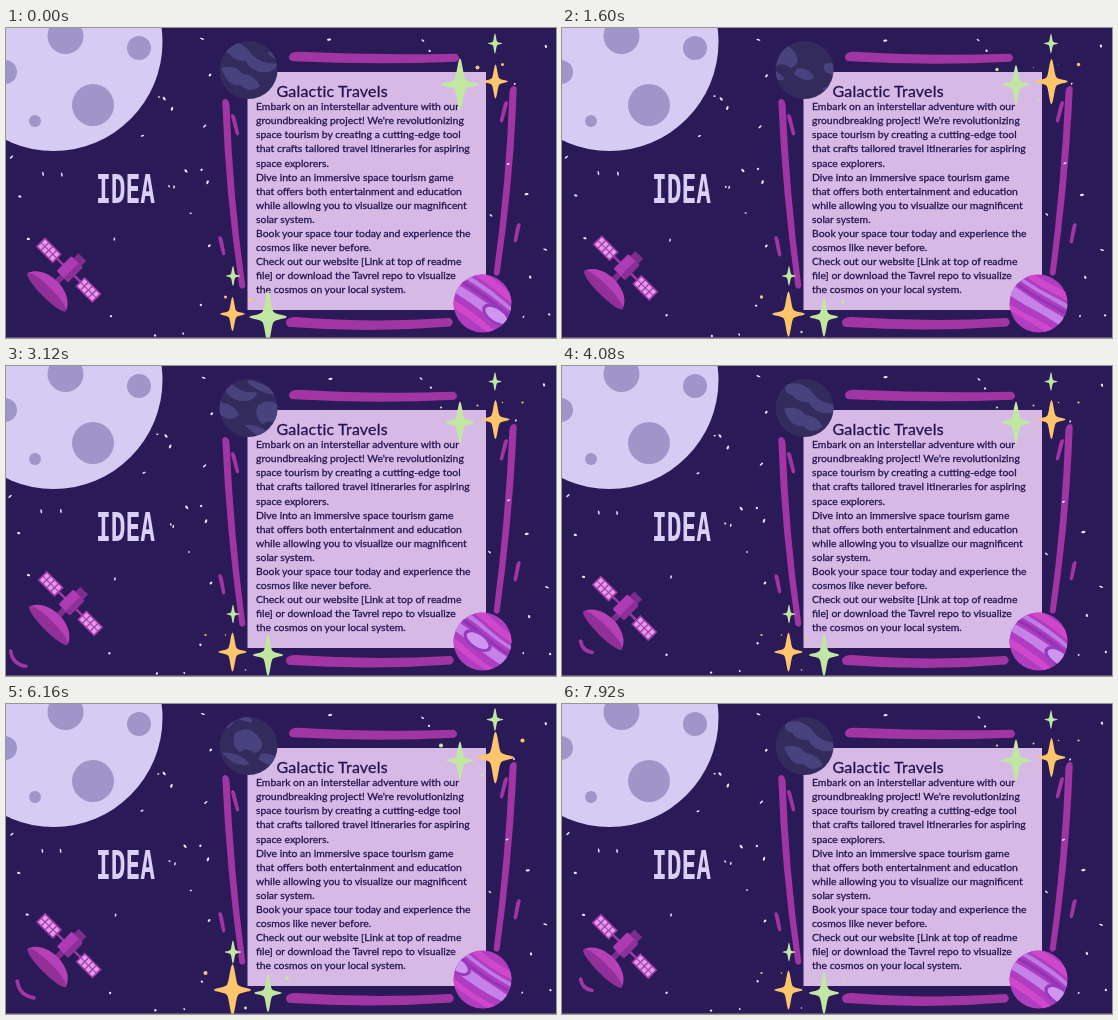
Animation of 550x310 px, one loop 8000 ms. Source, as an HTML page:

```html
<!DOCTYPE html>
<html lang="en">
<head>
<meta charset="utf-8">
<title>Idea</title>
<style>
html, body { margin: 0; width: 100%; height: 100%; overflow: hidden; background: #2b1a58; }
svg { display: block; width: 550px; height: 310px; }
.body { font: 10.4px Lato, "Open Sans", sans-serif; fill: #22134f; stroke: #22134f; stroke-width: .28px; }
.title { font-size: 16px; letter-spacing: .2px; }
.idea { font: bold 38.4px "DejaVu Sans Mono", monospace; fill: #dacff4; }
</style>
</head>
<body>
<svg viewBox="0 0 550 310" xmlns="http://www.w3.org/2000/svg">
  <defs>
    <clipPath id="disc"><circle r="29"/></clipPath>
    <path id="star" d="M0-1C.08-.98.13-.32.21-.2S.72-.07.72 0S.29.08.21.2S.08.98 0 1S-.13.32-.21.2S-.72.07-.72 0S-.29-.08-.21-.2S-.08-.98 0-1Z"/>
    <g id="bands">
      <path fill="#cf48cc" d="M-60-24Q-30-29 0-24T60-24V-17Q30-13 0-17T-60-17Z"/>
      <path fill="#bd7be6" d="M-60-14Q-30-18 0-14T60-14V-10Q30-7 0-10T-60-10Z"/>
      <path fill="#8f35b4" d="M-60-7Q-30-11 0-7T60-7V-4Q30-1 0-4T-60-4Z"/>
      <path fill="#c583ea" d="M-60-1Q-30-4 0-2T60-1V7Q30 11 0 8T-60 7Z"/>
      <path fill="#cf48cc" d="M-60 14Q-30 11 0 15T60 14V20Q30 23 0 21T-60 20Z"/>
      <ellipse cy="2" rx="16" ry="8.5" fill="#963bbd"/>
      <ellipse cy="2" rx="12.5" ry="5.8" fill="#cf96f0"/>
    </g>
    <g id="blotches" fill="#48427f">
      <path d="M-34-14Q-20-25-6-17Q8-9 24-18Q26-8 12-3Q0-1-6-7Q-18-2-24-7Q-34-5-34-14Z"/>
      <path d="M-26 9Q-14 0-4 6Q8 2 17 10Q10 22-1 17Q-12 24-26 9Z"/>
      <path d="M30-6Q38-20 52-13Q66-6 56 4Q46 1 42 9Q30 6 30-6Z"/>
      <path d="M26 17Q40 9 56 16Q46 26 26 17Z"/>
      <path d="M-58 2Q-48-5-38 3Q-42 12-58 8Z"/>
      <ellipse cx="26" cy="-24" rx="15" ry="3.5"/>
    </g>
  </defs>

  <rect width="550" height="310" fill="#2b1a58"/>

  <circle cx="47.5" cy="14" r="109" fill="#d6ccf3"/>
  <g fill="#a095c8">
    <circle cx="59.5" cy="8" r="18"/>
    <circle cx="133" cy="20" r="12"/>
    <circle cx="-1" cy="44" r="12"/>
    <circle cx="87" cy="77" r="21"/>
    <circle cx="29" cy="93" r="6"/>
  </g>

  <text class="idea" transform="translate(90 174.5) scale(.64 1)">IDEA</text>

  <g id="arcs" fill="none" stroke="#a235a4" stroke-linecap="round"></g>
  <g id="sat"></g>

  <rect x="241.5" y="44" width="238.5" height="238" fill="#d7b9e5"/>
  <g id="frame" fill="#a235a4"></g>
  <g id="specks" fill="#eee8fb"></g>

  <g transform="translate(242.5 42)">
    <circle r="29" fill="#332b5c"/>
    <g clip-path="url(#disc)"><g id="dark"></g></g>
  </g>
  <g transform="translate(476.5 275.5)">
    <circle r="29" fill="#b03cc0"/>
    <g clip-path="url(#disc)"><g id="bright"></g></g>
  </g>

  <g id="copy" class="body"></g>
  <g id="sparkA" transform="translate(489.5 53.5)"></g>
  <g id="sparkB" transform="translate(226.5 286) scale(-1 1)"></g>
  <rect y="309" width="550" height="1" fill="#8b7f88" opacity=".6"/>
</svg>
<script>
const $ = id => document.getElementById(id);
const LOOP = 8000, BEAT = 960, BOB = 1920, SPIN = 3840;
const GREEN = '#c1e7a3', ORANGE = '#fdc56c';

const lines = [
  'Embark on an interstellar adventure with our',
  "groundbreaking project! We're revolutionizing",
  'space tourism by creating a cutting-edge tool',
  'that crafts tailored travel itineraries for aspiring',
  'space explorers.',
  'Dive into an immersive space tourism game',
  'that offers both entertainment and education',
  'while allowing you to visualize our magnificent',
  'solar system.',
  'Book your space tour today and experience the',
  'cosmos like never before.',
  'Check out our website [Link at top of readme',
  'file] or download the Tavrel repo to visualize',
  'the cosmos on your local system.'
];
$('copy').innerHTML = '<text class="title" x="270.5" y="69">Galactic Travels</text>' +
  lines.map((s, i) => `<text x="250" y="${(82.3 + i * 14.05).toFixed(2)}">${s}</text>`).join('');

// Satellite, drawn along its panel axis
function panel(x) {
  let s = `<rect x="${x}" y="-6.5" width="24" height="13" fill="#a237a9"/>`;
  for (let c = 0; c < 4; c++)
    for (let r = 0; r < 2; r++)
      s += `<rect x="${x + 1.6 + c * 5.5}" y="${-5 + r * 5.5}" width="4.2" height="4.5" fill="#e39aea"/>`;
  return s;
}
$('sat').innerHTML = `
  <rect x="-17" y="-1.2" width="34" height="2.4" fill="#a237a9"/>${panel(-40)}${panel(16)}
  <rect x="-5" y="-19" width="11" height="9" fill="#7d2b8c"/>
  <rect x="-3" y="7" width="6" height="12" fill="#7d2b8c"/>
  <rect x="-8" y="-12" width="16" height="21" rx="1.5" fill="#ae3ab4"/>
  <rect x="2" y="-12" width="6" height="21" rx="1.5" fill="#8c2f98"/>
  <path d="M-27 31C-20 11 20 11 27 31Z" fill="#b640b6"/>
  <ellipse cy="31" rx="27" ry="5.5" fill="#92309a"/>`;

const specks = [
  152,69, 159,70, 168,160, 195,141, 197,11, 539,19, 509,55, 521,167, 484,187, 150,307,
  5,130, 22,210, 178,306, 165,81, 137,107, 195,278, 55,146, 205,47, 184,186, 180,142,
  109,212, 104,288, 540,221, 524,250, 517,288, 324,12, 416,13, 424,22, 199,99, 13,168,
  164,158, 201,155, 502,135, 544,287, 36,146, 204,217
];
for (let i = 0; i < specks.length; i += 2)
  $('specks').innerHTML += `<ellipse rx="${1.2 + i % 3 * .45}" ry="${.8 + i % 4 * .15}"/>`;
const speckNodes = [...$('specks').children];

// Blunt brush stroke from (x1,y1) to (x2,y2), bowed by its middle control point
function brush(x1, y1, x2, y2, w, bend) {
  const len = Math.hypot(x2 - x1, y2 - y1), h = w / 2;
  const turn = Math.atan2(y2 - y1, x2 - x1) * 180 / Math.PI;
  return `<path transform="translate(${x1} ${y1}) rotate(${turn})" d="M0 0Q1 ${-h} ${h * 2} ${-h}` +
    `Q${len * .5} ${-h + bend} ${len - h} ${-h * .9}Q${len + 1} 0 ${len - h} ${h * .8}` +
    `Q${len * .5} ${h + bend} ${h} ${h}Q0 ${h} 0 0Z"/>`;
}
function side(d) {
  return brush(219.5, 71, 236.5, 262, 7, 4 + d) +
    brush(226.5, 86, 232, 108, 4, 0) + brush(214, 208, 218, 229 - d, 4, 0);
}
function drawFrame(pose) {
  const d = pose ? 0 : 1;
  $('frame').innerHTML = brush(283, 28.5, 453 + d * 2, 30, 9.5, 4 - d) +
    brush(280, 294, 450 - d, 294.5, 10, 5 + d) + side(d) +
    `<g transform="translate(727 -13) scale(-1 1)">${side(d)}</g>`;
}

const star = (x, y, h, fill) =>
  `<use href="#star" transform="translate(${x} ${y}) scale(${h / 2})" fill="${fill}"/>`;
const dot = (x, y, r, fill) => `<circle cx="${x}" cy="${y}" r="${r}" fill="${fill}"/>`;

function sparkles(t) {
  const c = Math.cos(t / BEAT * 2 * Math.PI);
  const up = (1 - c) / 2, down = (1 + c) / 2;
  const s = star(0, 0, 34 + 20 * up ** 2, ORANGE) +
    star(-35.5, 3, 38 + 14 * down ** 1.8, GREEN) +
    star(-.5, -38, 17 + 3 * down + 9 * up ** 6, GREEN) +
    dot(-18, -14, 2 * down, ORANGE) + dot(7, -17, 1.5 * down, ORANGE) +
    dot(-54.5, -12, 2.2 * up, GREEN) + dot(27, -17, 2.2 * up, ORANGE) + dot(-13, 18, 1.6 * up, GREEN);
  $('sparkA').innerHTML = $('sparkB').innerHTML = s;
}

// Signal arc: opens quickly, slows down as it leaves the dish, then thins out
function arc(age) {
  if (age < 0 || age > 1000) return '';
  const a = age / 1000, ease = 1 - (1 - a) ** 2;
  const x = 28 - 18 * ease, w = 12.5 * Math.min(1, a * 6) - 2.5 * a;
  const thick = 3.8 * Math.min(1, (1 - a) * 2.5);
  return `<path transform="translate(${x} ${305 - x}) rotate(45)" stroke-width="${thick}" d="M${-w} 0Q0 ${w * .75} ${w} 0"/>`;
}

function globe(id, ref, turn, shift) {
  const x = ((shift % 120) + 120) % 120;
  $(id).innerHTML = `<g transform="rotate(${turn})">` +
    [x, x - 120].map(v => `<use href="#${ref}" x="${v}"/>`).join('') + '</g>';
}

function draw(t) {
  const bob = (1 - Math.cos((t / BOB - .08) * 2 * Math.PI)) / 2;
  $('sat').setAttribute('transform', `translate(${62.5 + 2 * bob} ${242.5 - 5 * bob}) rotate(45)`);
  const p = t % BOB;
  $('arcs').innerHTML = arc(p - 130) + arc(p - 560);

  const spin = t / SPIN * 120;
  globe('bright', 'bands', 34, spin + 18);
  globe('dark', 'blotches', 24, spin);

  drawFrame(p >= 300);
  sparkles(t);
  speckNodes.forEach((n, i) => {
    const a = t / BOB * 2 * Math.PI + i * 2.4;
    n.setAttribute('transform',
      `translate(${specks[i * 2] + Math.cos(a)} ${specks[i * 2 + 1] + Math.sin(a)}) rotate(${i * 50})`);
  });
}

const start = performance.now();
function tick() {
  const t = (performance.now() - start) % LOOP;
  draw(Math.floor(t / 80) * 80);
  requestAnimationFrame(tick);
}
tick();
</script>
</body>
</html>
```
